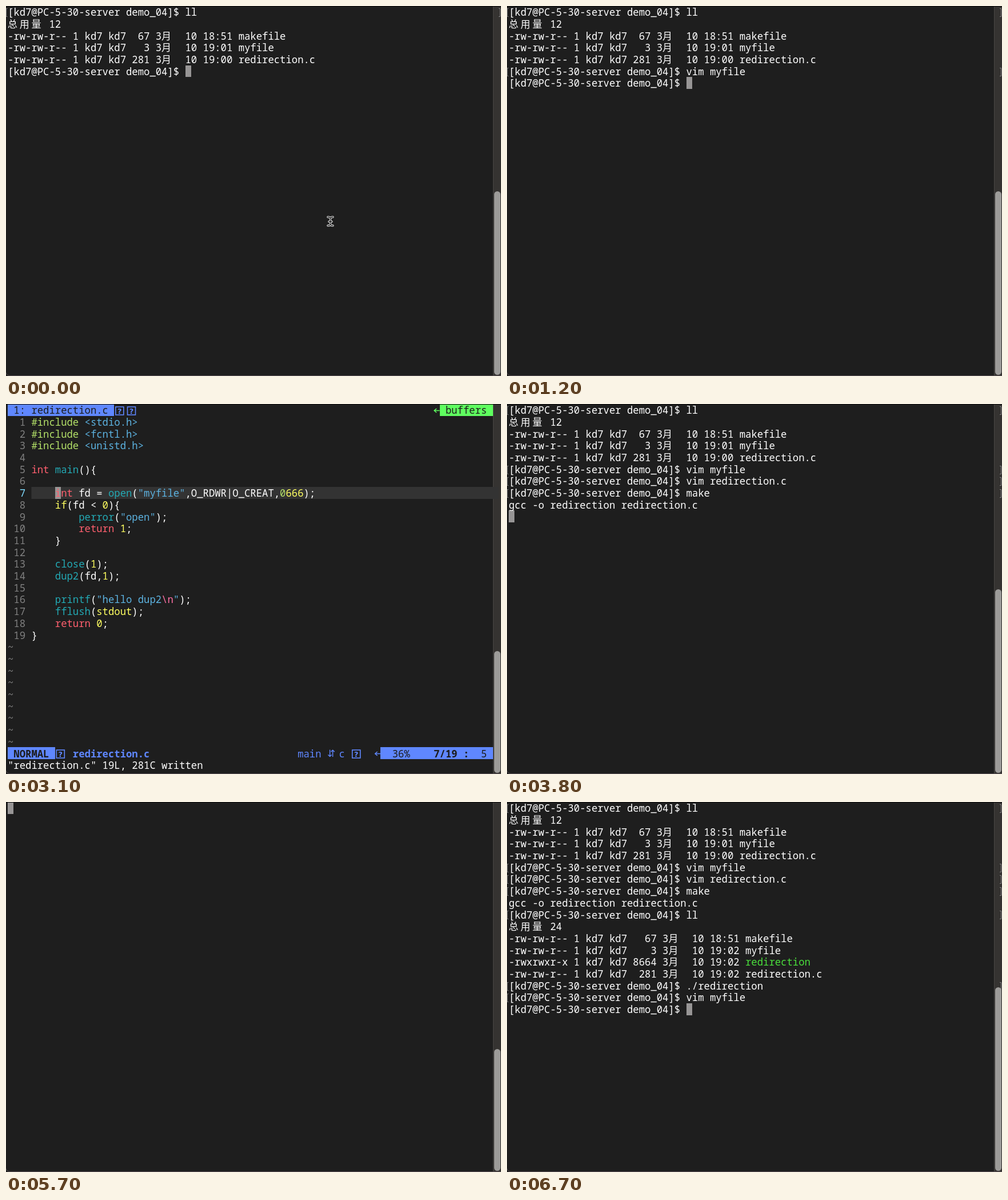
An HTML page with a canvas for the animation above (6.75 s loop, 866 by 647 pixels).

```html
<!DOCTYPE html>
<html lang="zh">
<head>
<meta charset="utf-8">
<title>Terminal session</title>
<style>
  html, body { margin: 0; width: 100%; height: 100%; overflow: hidden; background: #1e1e1e; }
  canvas { display: block; }
</style>
</head>
<body>
<canvas id="stage" width="866" height="647"></canvas>
<script>
const ctx = document.getElementById('stage').getContext('2d');
const LOOP = 6750, CELL = 10.35, ROW = 20.7, LEFT = 3;
const MONO = '17.25px "Noto Sans Mono", "DejaVu Sans Mono", monospace';
const WIDE = '17px "Noto Sans CJK SC", "Noto Sans CJK", sans-serif';
const BACK = '#1e1e1e', CURSOR = '#979595';
const PROMPT = '[kd7@PC-5-30-server demo_04]$ ';

// A "§" followed by one of these keys switches the text colour.
const COLORS = {
  w: '#ffffff', k: '#1c1c1c', b: '#5f87ff', g: '#5fff5f', x: '#4ade3c', d: '#808080', c: '#7fdcff',
  i: '#b3e068', h: '#5cb2e0', r: '#ff5f6e', t: '#23a9b4', y: '#ffff60', p: '#ff6fa5'
};

const x = col => LEFT + col * CELL;
const y = row => Math.round(row * ROW);

function bar(col, row, cols, color) {
  ctx.fillStyle = color;
  const left = Math.round(x(col));
  ctx.fillRect(left, y(row), Math.round(x(col + cols)) - left, y(row + 1) - y(row));
}

function write(col, row, text, weight = 500) {
  const base = row * ROW + 17.2;
  for (const part of ('§w' + text).split('§').slice(1)) {
    ctx.fillStyle = COLORS[part[0]];
    for (const run of part.slice(1).match(/[\u4e00-\u9fff]|[^\u4e00-\u9fff]+/g) || []) {
      const wide = run >= '\u4e00';
      ctx.font = weight + ' ' + (wide ? WIDE : MONO);
      ctx.fillText(run, x(col), base);
      col += wide ? 2 : run.length;
    }
  }
}

// ---- shell ----

function listing(row, time, total, files) {
  return [[row, time, '总用量 ' + total], ...files.map(([mode, size, clock, name], i) =>
    [row + 1 + i, time, `-${mode} 1 kd7 kd7 ${size} 3月  10 ${clock} ${name}`])];
}

const RW = 'rw-rw-r--';
const output = [
  ...listing(1, 0, 12, [
    [RW, ' 67', '18:51', 'makefile'],
    [RW, '  3', '19:01', 'myfile'],
    [RW, '281', '19:00', 'redirection.c']]),
  [8, 3750, 'gcc -o redirection redirection.c'],
  ...listing(10, 4150, 24, [
    [RW, '  67', '18:51', 'makefile'],
    [RW, '   3', '19:02', 'myfile'],
    ['rwxrwxr-x', '8664', '19:02', '§xredirection'],
    [RW, ' 281', '19:02', 'redirection.c']])
];

// keys: [time, text typed so far]; entered: line gets its marks; left: cursor moves on
const command = (row, shown, keys, entered, left) => ({ row, shown, keys, entered, left });
const editMyfile = (row, shown, start) => command(row, shown, [
  [start, 'v'], [start + 50, 'vi'], [start + 150, 'vim'], [start + 200, 'vim '],
  [start + 250, 'vim m'], [start + 300, 'vim my'], [start + 400, 'vim myfile ']
], start + 450, start + 500);

const commands = [
  command(0, 0, [[0, 'll']], 0, 0),
  editMyfile(5, 0, 150),
  command(6, 1200, [[1250, 'v'], [1350, 'vi'], [1400, 'vim'], [1500, 'vim '], [1650, 'vim r'],
    [1700, 'vim re'], [1750, 'vim redirection.c ']], 1800, 1950),
  command(7, 3250, [[3350, 'm'], [3400, 'ma'], [3500, 'mak'], [3550, 'make']], 3700, 3750),
  command(9, 3850, [[4000, 'l'], [4050, 'll']], 4100, 4150),
  command(15, 4150, [[4450, './'], [4700, './redirection ']], 4700, 4950),
  editMyfile(16, 5050, 5200),
  command(17, 6700, [], LOOP, LOOP)
];

const latest = (steps, t) => steps.filter(([time]) => time <= t).pop();

function drawMarks(row) {
  ctx.strokeStyle = '#858585';
  ctx.lineWidth = 1;
  const top = y(row) + 4.5, bottom = top + 14;
  ctx.beginPath();
  for (const [edge, tip] of [[0.5, 2.5], [864.5, 862]]) {
    ctx.moveTo(tip, top);
    ctx.lineTo(edge, top);
    ctx.lineTo(edge, bottom);
    ctx.lineTo(tip, bottom);
  }
  ctx.stroke();
}

function drawShell(t) {
  const lines = output.filter(line => line[1] <= t);
  const visible = commands.filter(c => c.shown <= t);
  const current = visible[visible.length - 1];
  const typed = c => (latest(c.keys, t) || [0, ''])[1];
  if (t < current.left) {
    bar(PROMPT.length + typed(current).length, current.row, 1, CURSOR);
  } else {
    bar(0, 1 + Math.max(...lines.map(l => l[0]), current.row), 1, CURSOR);
  }
  for (const [row, , text] of lines) write(0, row, text);
  for (const c of visible) {
    write(0, c.row, PROMPT + typed(c));
    if (t >= c.entered) drawMarks(c.row);
  }
}

// ---- editor ----

const program = [
  '§i#include §h<stdio.h>', '§i#include §h<fcntl.h>', '§i#include §h<unistd.h>', '',
  '§rint §tmain§w(){', '',
  '    §rint§w fd = §topen§w(§h"myfile"§w,O_RDWR|O_CREAT,§i0§y666§w);',
  '    §yif§w(fd < §y0§w){',
  '        §tperror§w(§h"open"§w);',
  '        §rreturn §y1§w;',
  '    }', '',
  '    §tclose§w(§y1§w);',
  '    §tdup2§w(fd,§y1§w);', '',
  '    §tprintf§w(§h"hello dup2§p\\n§h"§w);',
  '    §tfflush§w(§ystdout§w);',
  '    §rreturn §y0§w;',
  '}'
];

const myfile = { name: 'myfile', line: 1, col: 0, percent: '100%' };
const sessions = [
  { ...myfile, open: 650, close: 1150, text: ['aa'],
    footer: [[900, '"myfile" 1L, 3C'], [1000, ':'], [1100, ':q']] },
  { name: 'redirection.c', line: 7, col: 4, percent: '36%', type: 'c', scope: 'main',
    open: 2000, close: 3250, text: program,
    footer: [[2150, '"redirection.c" 19L, 281C'], [2750, ':'], [2850, ':w'], [2950, ':wq'],
      [3100, '"redirection.c" 19L, 281C written']] },
  { ...myfile, open: 5700, close: 6700, text: ['hello dup2'],
    footer: [[5900, '"myfile" 1L, 11C'], [6400, ':'], [6550, ':q']] }
];

// Box shown for a glyph the terminal font lacks.
function missingGlyph(col, row) {
  const left = x(col) + 2, top = y(row) + 5;
  ctx.strokeStyle = ctx.fillStyle = COLORS.b;
  ctx.lineWidth = 1.6;
  ctx.strokeRect(left + .5, top, 14, 14);
  ctx.font = 'bold 13px "DejaVu Sans", sans-serif';
  ctx.textAlign = 'center';
  ctx.fillText('?', left + 7.5, top + 12);
  ctx.textAlign = 'left';
}

function separator(col, row, color) {
  const tip = x(col) + 1, mid = y(row) + 11.5;
  ctx.strokeStyle = color;
  ctx.lineWidth = 1.5;
  ctx.beginPath();
  ctx.moveTo(x(col + 1), mid);
  ctx.lineTo(tip, mid);
  ctx.moveTo(tip + 4, mid - 3.5);
  ctx.lineTo(tip, mid);
  ctx.lineTo(tip + 4, mid + 3.5);
  ctx.stroke();
}

function drawTabs({ name }) {
  const end = name.length + 5;
  bar(0, 0, end, COLORS.b);
  write(1, 0, '§k1: ' + name);
  missingGlyph(end, 0);
  missingGlyph(end + 2, 0);
  separator(72, 0, COLORS.g);
  bar(73, 0, 9, COLORS.g);
  write(74, 0, '§kbuffers');
}

function drawStatus({ name, line, col, percent, type, scope, text }) {
  bar(0, 29, 8, COLORS.b);
  write(1, 29, '§kNORMAL', 700);
  missingGlyph(8, 29);
  write(11, 29, '§b' + name, 700);
  if (type) {
    write(49, 29, '§b' + scope);
    ctx.font = '17px "DejaVu Sans", sans-serif';
    ctx.fillText('⇵', x(54), 29 * ROW + 17);
    write(56, 29, '§b' + type);
  }
  missingGlyph(58, 29);
  separator(62, 29, COLORS.b);
  bar(63, 29, 19, COLORS.b);
  write(68 - percent.length, 29, '§k' + percent);
  write(72, 29, '§k' + `${line}/${text.length}`.padStart(4) + ' :', 700);
  write(80, 29, '§k' + (col + 1));
}

function drawEditor(session, t) {
  const age = t - session.open;
  if (age < 50) return bar(0, 0, 1, CURSOR);
  const footer = (latest(session.footer, t) || [0, ''])[1];
  ctx.fillStyle = '#333333';
  ctx.fillRect(x(4), y(session.line), 862 - x(4), y(session.line + 1) - y(session.line));
  if (footer[0] === ':') bar(footer.length, 30, 1, CURSOR);
  else bar(4 + session.col, session.line, 1, CURSOR);
  drawTabs(session);
  for (let row = 1; row < 29; row++) {
    if (row > session.text.length) {
      write(0, row, '§d~');
    } else {
      write(0, row, (row === session.line ? '§c' : '§d') + String(row).padStart(3));
      write(4, row, session.text[row - 1]);
    }
  }
  if (age >= 100) drawStatus(session);
  write(0, 30, footer);
}

// ---- window ----

function drawScrollbar(top) {
  ctx.fillStyle = '#353331';
  ctx.fillRect(852, 0, 14, 647);
  ctx.fillStyle = '#484644';
  ctx.fillRect(852, 0, 1, 647);
  return () => {
    ctx.fillStyle = '#9c9b99';
    ctx.beginPath();
    ctx.roundRect(854, top, 11, 645 - top, 5.5);
    ctx.fill();
  };
}

function drawWindowEdge() {
  ctx.fillStyle = '#080808';
  ctx.fillRect(0, 0, 866, 1);
  ctx.strokeStyle = '#554c50';
  ctx.lineWidth = 1;
  ctx.beginPath();
  ctx.moveTo(0, 641);
  ctx.quadraticCurveTo(1, 646.5, 8, 646.5);
  ctx.lineTo(866, 646.5);
  ctx.stroke();
}

function drawPointer() {
  const beam = new Path2D('M563 369 Q567.5 369 567.5 372 V381 Q567.5 384 563 384 ' +
    'M572 369 Q567.5 369 567.5 372 M567.5 381 Q567.5 384 572 384 M565 377 H570');
  ctx.lineCap = 'round';
  for (const [width, color] of [[3.4, '#f4f4f4'], [1.3, '#111111']]) {
    ctx.lineWidth = width;
    ctx.strokeStyle = color;
    ctx.stroke(beam);
  }
  ctx.lineCap = 'butt';
}

function draw(now) {
  const t = now % LOOP;
  const session = sessions.find(s => t >= s.open && t < s.close);
  ctx.fillStyle = BACK;
  ctx.fillRect(0, 0, 866, 647);
  const drawThumb = drawScrollbar(session ? 432 : 324);
  if (session) drawEditor(session, t);
  else drawShell(t);
  drawThumb();
  drawWindowEdge();
  if (t < 150) drawPointer();
  requestAnimationFrame(draw);
}
requestAnimationFrame(draw);
</script>
</body>
</html>
```
